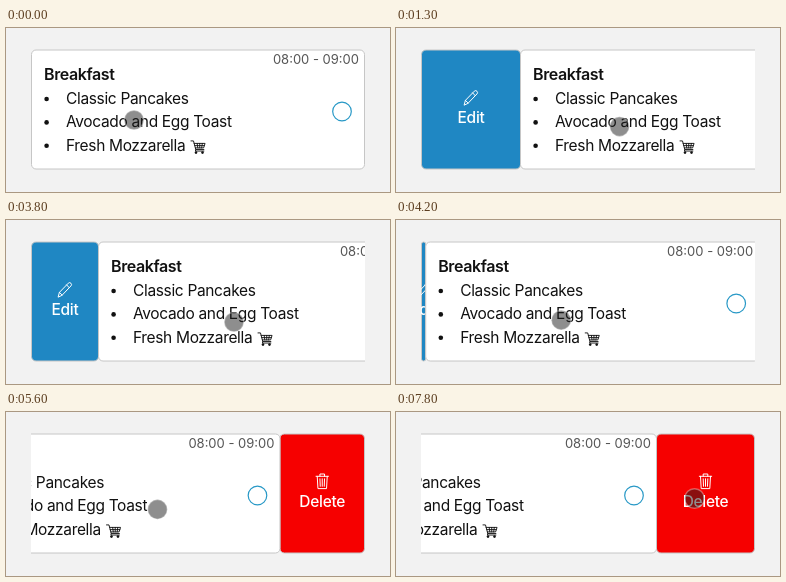
Recreate the animation shown at these times as an HTML page with a canvas. Size 384x164 px, loop 8000 ms.

```html
<!DOCTYPE html>
<html lang="en">
<head>
<meta charset="utf-8">
<title>Swipe actions</title>
<style>
html, body { margin: 0; width: 100%; height: 100%; overflow: hidden; background: #f2f2f2; }
canvas { display: block; width: 384px; height: 164px; }
</style>
</head>
<body>
<canvas id="stage"></canvas>
<script>
const W = 384, H = 164, LOOP = 8000, STEP = 100;
const FONT = 'Inter, "Liberation Sans", sans-serif';
const EDGE = '#c6c6c6', INK = '#111';
const LEFT = 25.5, RIGHT = 358.5, TOP = 22, TALL = 119;
const canvas = document.getElementById('stage');
const ctx = canvas.getContext('2d');
const dpr = window.devicePixelRatio || 1;
canvas.width = W * dpr;
canvas.height = H * dpr;

function ease(t, from, to) {
  const u = Math.min(1, Math.max(0, (t - from) / (to - from)));
  return u * u * (3 - 2 * u);
}

// Each drag pulls past the resting width, then springs back to it
const REST = 98;
function cardShift(t) {
  const over = 12.5, overBack = 24;
  const edit = (REST + over) * ease(t, 500, 1500) - over * ease(t, 1500, 1900);
  const close = REST * ease(t, 3500, 4300);
  const remove = (REST + overBack) * ease(t, 5000, 5950) - overBack * ease(t, 5950, 6510);
  return edit - close - remove;
}

function pointerAt(t) {
  let x = 128, y = 92;
  const glide = (from, to, nx, ny) => {
    const k = ease(t, from, to);
    x += (nx - x) * k;
    y += (ny - y) * k;
  };
  glide(0, 200, 93, 106);
  glide(300, 1500, 234, 98);     // drag Edit open
  glide(1600, 2100, 268, 95);
  glide(2500, 2800, 76, 82);     // point at Edit
  glide(3000, 3300, 259, 103);
  glide(3500, 4300, 161, 100);   // drag closed
  glide(4400, 4900, 236, 96);
  glide(5000, 5950, 114, 98);    // drag Delete open
  glide(5950, 6500, 248, 91);
  glide(7000, 7400, 319, 76);
  glide(7500, 7800, 298.5, 86.5); // point at Delete
  return [x, y];
}

function text(str, x, y, size, color, { weight = 400, spacing = 0, align = 'left' } = {}) {
  ctx.font = `${weight} ${size}px ${FONT}`;
  ctx.letterSpacing = spacing + 'px';
  ctx.textAlign = align;
  ctx.fillStyle = color;
  ctx.fillText(str, x, y);
}

function box(x, w, fill) {
  ctx.beginPath();
  ctx.roundRect(x, TOP, w, TALL, 4.5);
  ctx.fillStyle = fill;
  ctx.fill();
  ctx.strokeStyle = EDGE;
  ctx.lineWidth = 1;
  ctx.stroke();
}

function circle(x, y, r, fill, stroke, width) {
  ctx.beginPath();
  ctx.arc(x, y, r, 0, Math.PI * 2);
  if (fill) {
    ctx.fillStyle = fill;
    ctx.fill();
  }
  if (stroke) {
    ctx.strokeStyle = stroke;
    ctx.lineWidth = width;
    ctx.stroke();
  }
}

function icon(x, y, scale, path, color) {
  ctx.save();
  ctx.translate(x, y);
  ctx.scale(scale, scale);
  ctx.strokeStyle = color;
  ctx.lineWidth = 1;
  ctx.lineCap = ctx.lineJoin = 'round';
  ctx.stroke(new Path2D(path));
  ctx.restore();
}

const CART = 'M0 1H2.7L5.2 10.3H14M3.4 3.7H15.3L13.7 8.6H4.7M4 6.1H14.5M6.7 3.7L7.4 8.6M9.5 3.7V8.6M12.3 3.7L11.6 8.6M5.2 10.3L4.8 12H14';
const PENCIL = 'M-6.8 7.5L-5.6 3.1L3.3-6.1Q4.6-7.4 6-6Q7.2-4.7 6-3.4L-2.8 5.8ZM-5.6 3.1L-2.8 5.8M1.6-4.4L4.3-1.6';
const BIN = 'M-6.2-5H6.2M-2.3-5V-7.3H2.3V-5M-5-5L-4.3 7.3H4.3L5-5M-2.3-2.5L-2 5M0-2.5V5M2.3-2.5L2 5';

function action(x, w, color, path, label) {
  if (w <= 0) return;
  const mid = x + w / 2;
  ctx.save();
  ctx.beginPath();
  ctx.rect(x - 0.5, 20, w + 1, 124);
  ctx.clip();
  box(x, w, color);
  icon(mid, 69.3, 1, path, '#fff');
  text(label, mid, 95, 15.5, '#fff', { weight: 550, spacing: -0.3, align: 'center' });
  ctx.restore();
}

function card(dx) {
  ctx.save();
  ctx.translate(dx, 0);
  box(LEFT, RIGHT - LEFT, '#fff');
  text('08:00 - 09:00', 353, 36, 13, '#555', { align: 'right' });
  text('Breakfast', 38, 52, 16, INK, { weight: 600, spacing: -0.4 });
  ['Classic Pancakes', 'Avocado and Egg Toast', 'Fresh Mozzarella'].forEach((item, i) => {
    const y = 76 + i * 23.4;
    circle(40.6, y - 5, 2.3, INK);
    text(item, 60, y, 15.5, INK, { spacing: -0.34 });
  });
  icon(185, 112, 0.92, CART, INK);
  for (const x of [190, 196.5]) circle(x, 124.6, 1.3, INK);
  circle(336, 83.5, 9.3, null, '#2798c6', 1.2);
  ctx.restore();
}

function draw(t) {
  const dx = cardShift(t);
  ctx.setTransform(dpr, 0, 0, dpr, 0, 0);
  ctx.fillStyle = '#f2f2f2';
  ctx.fillRect(0, 0, W, H);
  ctx.save();
  ctx.beginPath();
  ctx.rect(25, 21, 334, 121);
  ctx.clip();
  action(LEFT, dx, '#1f87c3', PENCIL, 'Edit');
  action(RIGHT + dx, -dx, '#f60000', BIN, 'Delete');
  card(dx);
  ctx.restore();
  const [x, y] = pointerAt(t);
  circle(x, y, 9.8, 'rgba(30, 30, 30, 0.5)', 'rgba(255, 255, 255, 0.35)', 1.4);
}

const start = performance.now();
function tick() {
  const t = (performance.now() - start) % LOOP;
  draw(Math.floor(t / STEP) * STEP);
  requestAnimationFrame(tick);
}
tick();
</script>
</body>
</html>
```
